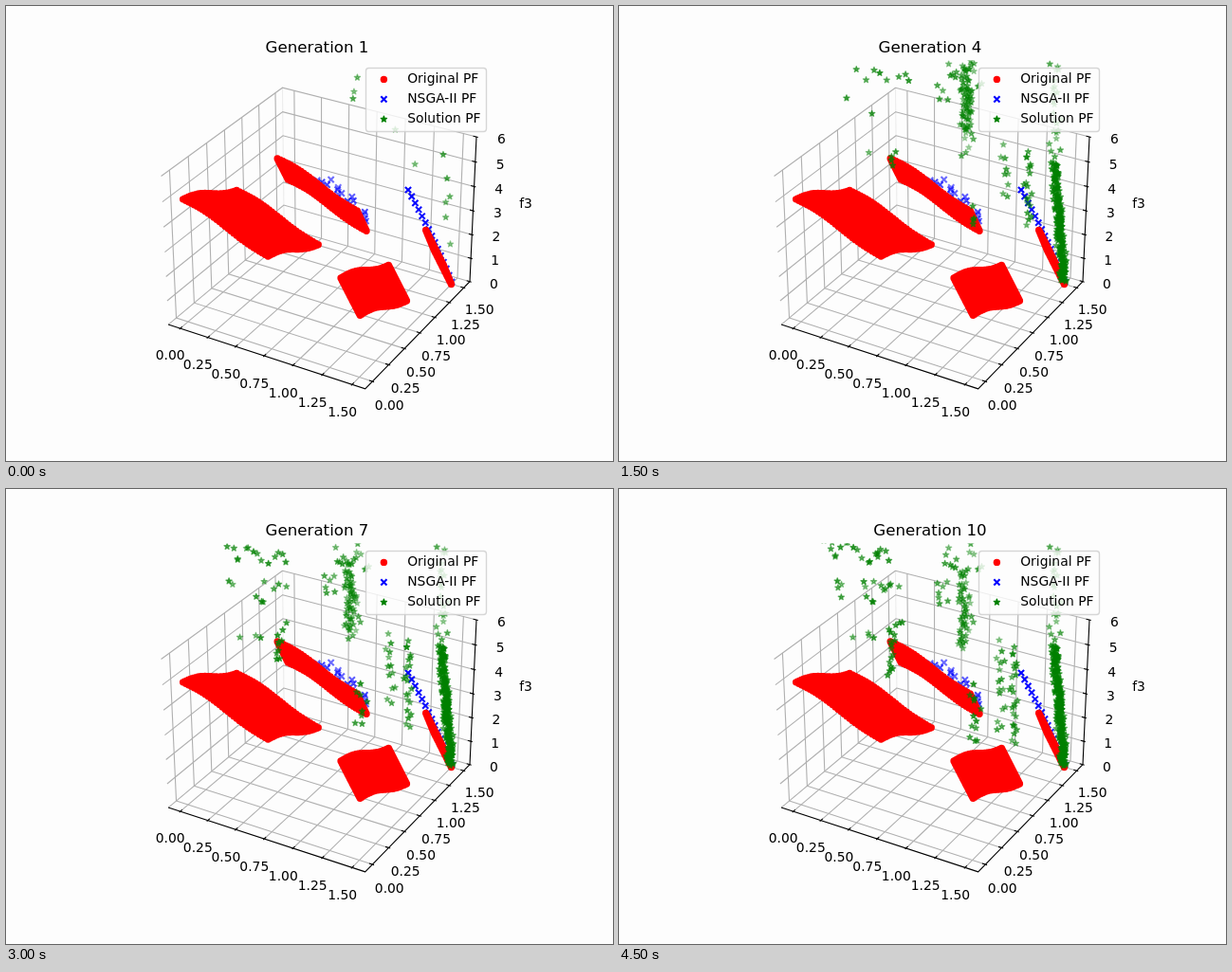
Recreate the animation shown at these times as an HTML page with a canvas. Size 640 by 480 pixels, loop 5000 ms.

```html
<!DOCTYPE html>
<html lang="en">
<head>
<meta charset="utf-8">
<title>Pareto front by generation</title>
<style>
  html, body { margin: 0; width: 100%; height: 100%; overflow: hidden; background: #fdfdfd; }
  canvas { display: block; }
</style>
</head>
<body>
<canvas id="stage" width="640" height="480"></canvas>
<script>
const ctx = document.getElementById('stage').getContext('2d');
const FONT = '"DejaVu Sans", sans-serif';
const STEP = 500, GENERATIONS = 10;
const mix = (a, b, k) => a + (b - a) * k;

// Perspective view of a box, elevation 30, azimuth -60; box coordinates run 0..1.
function project(x, y, z) {
  const dx = (x - 0.5) * 1.1905, dy = (y - 0.5) * 1.1905, dz = (z - 0.5) * 0.8929;
  const depth = 10 - (0.433 * dx - 0.75 * dy + 0.5 * dz);
  return [
    333 + 1997.8 * (0.866 * dx + 0.5 * dy) / depth,
    237.4 - 1997.8 * (-0.25 * dx + 0.433 * dy + 0.866 * dz) / depth
  ];
}

// Data value on the f1 or f2 axis to box coordinate.
const onAxis = v => (v + 0.1094) / 1.71875;

function line3(color, ...points) {
  ctx.beginPath();
  for (const p of points) ctx.lineTo(...project(...p));
  ctx.strokeStyle = color;
  ctx.lineWidth = 1.11;
  ctx.stroke();
}

function text(str, x, y, size = 13.89, align = 'center') {
  ctx.font = size + 'px ' + FONT;
  ctx.textAlign = align;
  ctx.fillStyle = '#000';
  ctx.fillText(str, x, y);
}

function label(str, point, drop) {
  const [x, y] = project(...point);
  text(str, x, y + drop);
}

function drawAxes() {
  const grey = '#b0b0b0', black = '#000', out = 0.008, inn = 0.016, pad = 0.083;
  line3('#ececec', [0, 1, 0], [0, 1, 1]);
  for (let i = 0; i <= 6; i++) {
    const t = onAxis(i / 4), z = i / 6;
    line3(grey, [t, 0, 0], [t, 1, 0], [t, 1, 1]);
    line3(grey, [1, t, 0], [0, t, 0], [0, t, 1]);
    line3(grey, [0, 0, z], [0, 1, z], [1, 1, z]);
  }
  line3(black, [0, 0, 0], [1, 0, 0], [1, 1, 0], [1, 1, 1]);
  for (let i = 0; i <= 6; i++) {
    const t = onAxis(i / 4), z = i / 6, name = (i / 4).toFixed(2);
    line3(black, [t, -out, 0], [t, inn, 0]);
    line3(black, [1 + out, t, 0], [1 - inn, t, 0]);
    line3(black, [1 + out, 1, z], [1 - inn, 1, z]);
    label(name, [t, -pad, -pad], 11);
    label(name, [1 + pad, t, -pad], 11);
    label(String(i), [1 + pad, 1 + pad, z], 10.5);
  }
  text('f3', 548, 213);
}

// The front is f3 = 5 - h(f1) - h(f2), on two ranges per variable.
const lowRange = u => ({
  v: 0.73 * u,
  h: 1.27 * (u - 0.06 * Math.sin(2 * Math.PI * u) - 0.04 * Math.sin(Math.PI * u))
});
const highRange = u => ({ v: mix(1.34, 1.5, u), h: mix(1.27, 2.5, u) });

function dot(x, y) {
  ctx.moveTo(x + 3.7, y);
  ctx.arc(x, y, 3.7, 0, 2 * Math.PI);
}

function drawFront() {
  const n = 30, ranges = [lowRange, highRange];
  ctx.beginPath();
  for (const rx of ranges) for (const ry of ranges)
    for (let i = 0; i <= n; i++) for (let j = 0; j <= n; j++) {
      const a = rx(i / n), b = ry(j / n);
      dot(...project(onAxis(a.v), onAxis(b.v), (5 - a.h - b.h) / 6));
    }
  ctx.fillStyle = '#f00';
  ctx.fill();
}

function cross(x, y, alpha) {
  const r = 3.1;
  ctx.globalAlpha = alpha;
  ctx.strokeStyle = '#00f';
  ctx.lineWidth = 2.08;
  ctx.beginPath();
  ctx.moveTo(x - r, y - r); ctx.lineTo(x + r, y + r);
  ctx.moveTo(x - r, y + r); ctx.lineTo(x + r, y - r);
  ctx.stroke();
  ctx.globalAlpha = 1;
}

function star(x, y, alpha) {
  ctx.globalAlpha = alpha;
  ctx.fillStyle = ctx.strokeStyle = '#008000';
  ctx.lineWidth = 1.39;
  ctx.lineJoin = 'round';
  ctx.beginPath();
  for (let i = 0; i < 10; i++) {
    const r = i % 2 ? 1.2 : 3.2, a = i * Math.PI / 5;
    ctx.lineTo(x + r * Math.sin(a), y - r * Math.cos(a));
  }
  ctx.closePath();
  ctx.fill();
  ctx.stroke();
  ctx.globalAlpha = 1;
}

function random(seed) {
  let s = seed * 7919 + 17;
  return () => {
    s = (s + 0x6D2B79F5) | 0;
    let t = Math.imul(s ^ (s >>> 15), 1 | s);
    t ^= t + Math.imul(t ^ (t >>> 7), 61 | t);
    return ((t ^ (t >>> 14)) >>> 0) / 4294967296;
  };
}

// Marks spread evenly along a segment, jittered by w around it.
let seed = 0;
function scatter(mark, n, [x0, y0], [x1, y1], w, alpha, bend = 1) {
  const rnd = random(++seed);
  for (let i = 0; i < Math.round(n); i++) {
    const t = (i * 0.618 + seed * 0.37) % 1;
    const x = mix(x0, x1, t) + (rnd() + rnd() - 1) * w;
    const y = mix(y0, y1, t ** bend) + (rnd() - 0.5) * w;
    mark(x, y, alpha + (rnd() - 0.5) * 0.25);
  }
}

function drawCrosses() {
  scatter(cross, 16, [330, 182], [385, 230], 6, 0.65, 1.4);
  for (let i = 0; i <= 14; i++) {
    const t = i / 14;
    cross(mix(424, 470, t) + 2 * Math.sin(Math.PI * t), mix(194, 291, t), 1 - 0.2 * t);
  }
}

function drawStars(g) {
  if (g === 1) {
    scatter(star, 3, [374, 62], [365, 99], 2, 0.45);
    scatter(star, 2, [405, 125], [442, 182], 2, 0.45);
    scatter(star, 6, [460, 146], [467, 256], 5, 0.45);
    return;
  }
  const k = Math.max(0, (g - 3) / 7), share = g === 2 ? 0.35 : 1;
  const left = g > 2 ? 1 : 0.5;
  const path = (n, a, b, w, alpha) => scatter(star, n * share, a, b, w, alpha);

  // Right edge: a dense lower column and a thin upper one.
  path(mix(150, 200, k), [469, 291], [459, 165], 5, 0.6);
  path(50, [469, 291], [464, 210], 3, 0.65);
  path(26, [459, 170], [460, 58], 7, 0.4);

  // Columns that sink as the generations pass.
  const mid = mix(370, 363, Math.min(1, 3 * k));
  path(mix(60, 38, k), [mid, mix(58, 85, k)], [mid, mix(125, 170, k)], mix(9, 6, k), 0.5);
  path(18, [372, 58], [368, 165], 16, 0.4);
  path(mix(18, 24, k), [mix(434, 417, k), mix(150, 165, k)], [mix(435, 417, k), mix(230, 272, k)], 5, 0.5);
  path(mix(8, 16, k), [mix(408, 403, k), mix(145, 158, k)], [mix(410, 403, k), mix(190, 250, k)], 9, 0.5);
  path(mix(8, 14, k), [348, 58], [342, mix(100, 128, k)], 12, 0.5);
  path(mix(3, 12, k), [369, 205], [mix(374, 379, k), mix(230, 274, k)], 9, 0.65);

  // Left side fills in late.
  path(mix(6, 20, k) * left, [mix(258, 220, k), mix(74, 62, k)], [mix(310, 285, k), mix(78, 74, k)], mix(12, 18, k), 0.6);
  path(16 * k, [mix(252, 240, k), 108], [292, 108], 24, 0.55);
  path(mix(2, 14, k), [291, mix(156, 142, k)], [285, mix(164, 198, k)], 5, 0.6);
  path(7 * k, [243, 160], [302, 140], 12, 0.55);
}

function drawLegend() {
  ctx.beginPath();
  ctx.roundRect(379.5, 65.5, 127, 67, 3);
  ctx.fillStyle = 'rgba(254,254,254,0.8)';
  ctx.fill();
  ctx.strokeStyle = 'rgba(204,204,204,0.8)';
  ctx.lineWidth = 1.39;
  ctx.stroke();

  ctx.beginPath();
  dot(398.4, 77.4);
  ctx.fillStyle = '#f00';
  ctx.fill();
  cross(398.4, 98.4, 1);
  star(398.4, 119.4, 1);
  ['Original PF', 'NSGA-II PF', 'Solution PF'].forEach((name, i) =>
    text(name, 423.2, 81 + i * 21, 13.89, 'left'));
}

function draw(g) {
  seed = 0;
  ctx.fillStyle = '#fdfdfd';
  ctx.fillRect(0, 0, 640, 480);
  drawAxes();
  ctx.save();
  ctx.beginPath();
  ctx.rect(143.2, 57.6, 369.6, 369.6);
  ctx.clip();
  drawCrosses();
  drawFront();
  drawStars(g);
  ctx.restore();
  drawLegend();
  text('Generation ' + g, 328, 49, 16.67);
}

const start = performance.now();
let shown = 0;
function tick() {
  const g = Math.floor((performance.now() - start) / STEP) % GENERATIONS + 1;
  if (g !== shown) draw(shown = g);
  requestAnimationFrame(tick);
}
tick();
</script>
</body>
</html>
```
